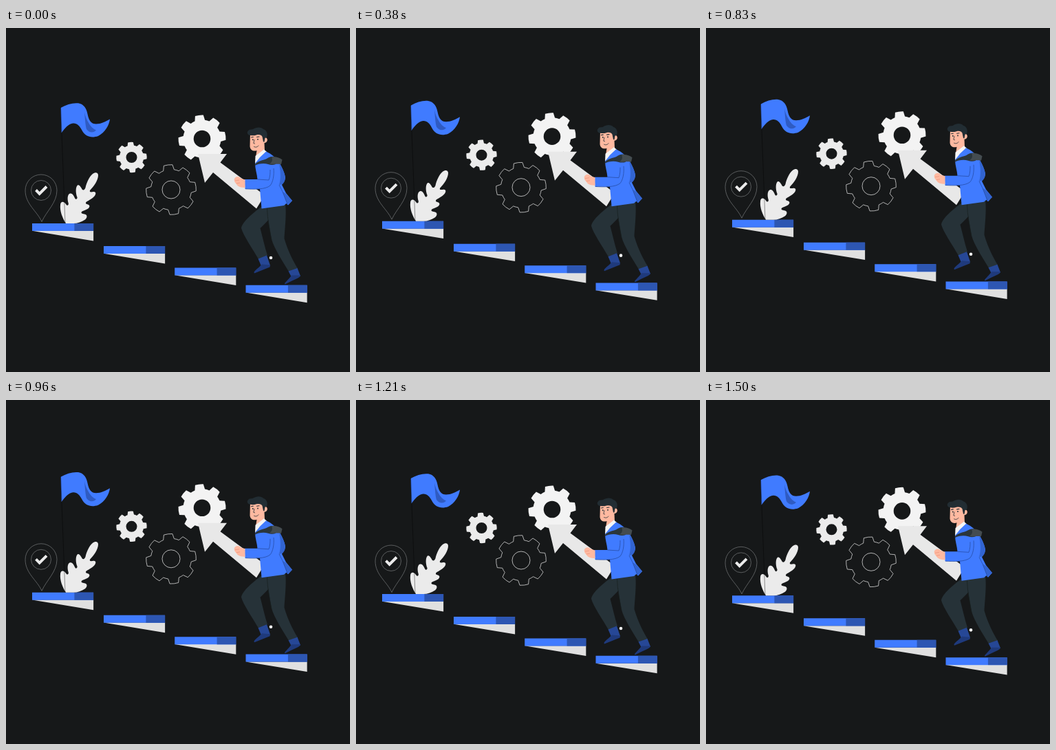
Recreate the animation shown at these times as an HTML page. Size 500 by 500 pixels, loop 1540 ms.

```html
<!DOCTYPE html>
<html lang="en">
<head>
<meta charset="utf-8">
<title>Climbing the steps</title>
<style>
  html, body { margin: 0; width: 100%; height: 100%; overflow: hidden; background: #161819; }
  svg { display: block; width: 100vw; height: 100vh; }
</style>
</head>
<body>
<svg viewBox="0 0 500 500">
  <rect width="500" height="500" fill="#161819"/>
  <g id="scene">
    <g id="steps"></g>

    <!-- flag -->
    <path fill="#407bff" d="M79.500 116C88 111 97 108.500 105 109.300C113 110.500 117 117 118.500 125C120.500 135 124 139.500 131 139.500C138 139.500 145 136 151 132.500C150 141 144 152 134 157C124 160.500 115 158 110 148C107 142 103 138 97.500 138.400C91 139 85 146 80.500 152.500Z"/>
    <path fill="#2f5bc2" d="M114 122C115 134 115.500 142 117 147C121 152.500 127 153 131 148.500C127 147 123 143 120.500 138.500C117 133 115 128 114 122Z"/>

    <!-- map pin -->
    <g fill="none" stroke="#777a7c" stroke-width=".7">
      <path d="M52 281.500C45 266 28 256 28 236A23 23 0 0 1 74 236C74 254 59 266 52 281.500Z"/>
      <circle cx="51" cy="236" r="14.500"/>
      <path stroke="#ebebeb" stroke-width="4" d="M43.500 235.500L48.700 240.800L59 230.500"/>
    </g>

    <!-- leaf and pole -->
    <path fill="#ebebeb" d="M87 284C82 276 78 266 79 257C79.500 251.500 84 251.500 87 256C89 259 91 258 90.800 255C89 249 89 242 93 240.500C97 239.500 99 245 100.500 248C102 250 104 248 103.500 246C101 240 101 231 104 228.500C107 227 109 232 111 235C113 236.500 115 234 115.500 232C117 225 121 216 126 212C130 209 134 210 134 214C134 221 128 230 122 236C121 239 124 238.500 127 238C131.500 237.500 131 242 128 245C124 249 119 251 116.500 253C115 255.500 117 256 119 256.500C122.500 257.500 122 261 118.500 263C115 265 112 265.500 110 267C108.500 269.500 111 270 114 270.500C119 271.500 118 276 115 278.500C110 282 104 284 98 284Z"/>
    <path stroke="#000" stroke-opacity=".45" stroke-width=".9" d="M79.500 115L86 284"/>

    <!-- gears and arrow -->
    <g id="gears"></g>
    <path fill="#e8e8e8" d="M279 183H321L311.500 195.500L376 243L364 262.500L301 210L289 225Z"/>

    <!-- legs -->
    <path fill="#263238" d="M371 260L392 261C388 274 376 285 369.500 291C373 304 376 318 380 330.500L367 336C358 320 345 302 342 291C343 282 360 268 371 260Z"/>
    <path fill="#264796" d="M366.500 335.500L379 330.500L384 345L371 346Z"/>
    <path fill="#1f3a7c" d="M372 343.500L384 344.500L383.500 347.500L361 356.500C358.500 354 366 350 372 343.500Z"/>
    <path fill="#263238" d="M379.500 260L406 256C408 270 405 295 404.500 306C410 325 418 340 424 349.500L411 354C402 339 390 321 386 307C383 291 380 275 379.500 260Z"/>
    <path fill="none" stroke="#18201f" stroke-width=".7" d="M379.500 262C380 278 383 292 386 308"/>
    <path fill="#264796" d="M410.500 353.500L423.500 349L428 360.500L416 364Z"/>
    <path fill="#1f3a7c" d="M415 359.500L428 359.500C428 363 420 365 405.500 372.500C403 371 411 366 415 359.500Z"/>
    <circle cx="385" cy="334" r="2.300" fill="#f5f5f5"/>

    <!-- head -->
    <path fill="#ffb9a0" d="M355 152L354.500 172C355 178 360 179.500 364.500 178L363 188L376 179L375.500 167C380 167 381.500 161 377.500 159L375 150Z"/>
    <path fill="#222d33" d="M355 156C351 156 349.500 151.500 352 149.500C353 147 357 148 359 147C364 143.500 371 143.500 374 147C379 148.500 381 154 379 159L376.500 160L375.500 165.500L374 165.500L372.500 158C371.500 155.500 368 154.500 364 155.500C361 156.500 358 156.500 355 156Z"/>
    <g fill="none" stroke="#263238" stroke-width=".8" stroke-linecap="round">
      <path stroke-width="1.100" d="M356.500 159L359.300 158.500M364.500 158.500L368 158"/>
      <path d="M361 162.500L359.800 167.500L361.500 168M360.500 172.500C363 174 365.500 173 367 171"/>
      <path stroke-width="1.700" d="M358.800 162V162.400M366 161.500V161.900"/>
    </g>

    <!-- jacket -->
    <path fill="#f5f5f5" d="M362.500 186L375 176.500L379 180L370 189L362 197Z"/>
    <path fill="#407bff" d="M378 179.500C386 183 393 189 398 197C402 204 405 211 406 217C406 221 403 225 401 228L407 240L416 251L410 257.500L407.500 255L404 258L371.500 262.500L369 234H347.500L346.500 220H365.500C365 212 362 205 362 197L369 188Z"/>
    <path fill="#3264d0" d="M397 197C399 208 400 218 397 228L402 227C405 224 406.500 220 405.500 215C404 208 401 202 397 197ZM402 238L409 257L416 251L407 241Z"/>
    <path fill="none" stroke="#274ea7" stroke-width=".8" d="M348 233.800C360 234.500 377 235 384 229C388 224 390 214 389 204M365.500 220L382 221C384 216 384 210 384 206M397 228L402 238L409 256"/>
    <path fill="#2b363b" d="M361.500 200C362 195 370 193 378 190.500C383 187 387 186.500 390 187L392 198C388 199.500 384 199 381 198C375 196 367 197 361.500 200Z"/>
    <path fill="#444c50" d="M386 187.500C392 186.500 398 188.500 401.500 191.500L400 198C394 197 389 198.500 383 197.500C387 195 388 191 386 187.500Z"/>

    <!-- hand -->
    <path fill="#ffb9a0" d="M347.500 220.500L341 218.500C338 215 334 215.500 332 219C331 222 333 225 335 227C337 231 342 232 347.500 232Z"/>
    <path fill="none" stroke="#e58b75" stroke-width=".6" d="M333 222L339 221M335 226L340 225"/>
  </g>
</svg>
<script>
const el = id => document.getElementById(id);
const scene = el('scene');
const LOOP = 1540, LOW = 715, FRAME = 1000 / 24;

const step = (x, y) => `
  <path fill="#e0e0e0" d="M${x} ${y + 10.8}h89.100v14.600z"/>
  <path fill="#407bff" d="M${x} ${y}h89.100v11h-89.100z"/>
  <path fill="#2d56b2" d="M${x + 61.4} ${y}h27.700v11h-27.700z"/>`;

const ring = (cx, cy, r) =>
  `M${cx - r} ${cy}a${r} ${r} 0 1 0 ${2 * r} 0a${r} ${r} 0 1 0 ${-2 * r} 0Z`;

// eight teeth; tilt is the angle of the first one
function gear(cx, cy, tip, root, hole, tilt, paint) {
  const foot = 15.5, top = 10;
  const at = (r, deg) => {
    const a = deg * Math.PI / 180;
    return `${(cx + r * Math.cos(a)).toFixed(2)} ${(cy + r * Math.sin(a)).toFixed(2)}`;
  };
  let d = '';
  for (let i = 0; i < 8; i++) {
    const a = tilt + i * 45;
    d += (i ? `A${root} ${root} 0 0 1 ` : 'M') + at(root, a - foot) +
      `L${at(tip, a - top)}A${tip} ${tip} 0 0 1 ${at(tip, a + top)}L${at(root, a + foot)}`;
  }
  d += `A${root} ${root} 0 0 1 ${at(root, tilt - foot)}Z`;
  return `<path ${paint} fill-rule="evenodd" d="${d}${ring(cx, cy, hole)}"/>`;
}

el('steps').innerHTML =
  step(38, 284) + step(142, 317) + step(245.2, 348.5) + step(348.5, 373.8);

el('gears').innerHTML =
  gear(182.5, 188, 22.2, 17.6, 8, -94, 'fill="#ebebeb"') +
  gear(240, 235, 36.3, 29.5, 13, -97, 'fill="none" stroke="#d8d8d8" stroke-width=".8"') +
  gear(285, 161, 34.5, 27.5, 12.3, -97, 'fill="#f3f3f3"');

// the whole scene floats up and down at a constant speed
function draw(ms) {
  const frame = Math.min(36, Math.floor((ms % LOOP + 5) / FRAME));
  const gap = Math.abs(frame * FRAME - LOW);
  const y = -6.36 + 0.0089 * Math.min(gap, LOOP - gap);
  scene.setAttribute('transform', `translate(0 ${y.toFixed(3)})`);
}

const start = performance.now();
function tick() {
  draw(performance.now() - start);
  requestAnimationFrame(tick);
}
tick();
</script>
</body>
</html>
```
